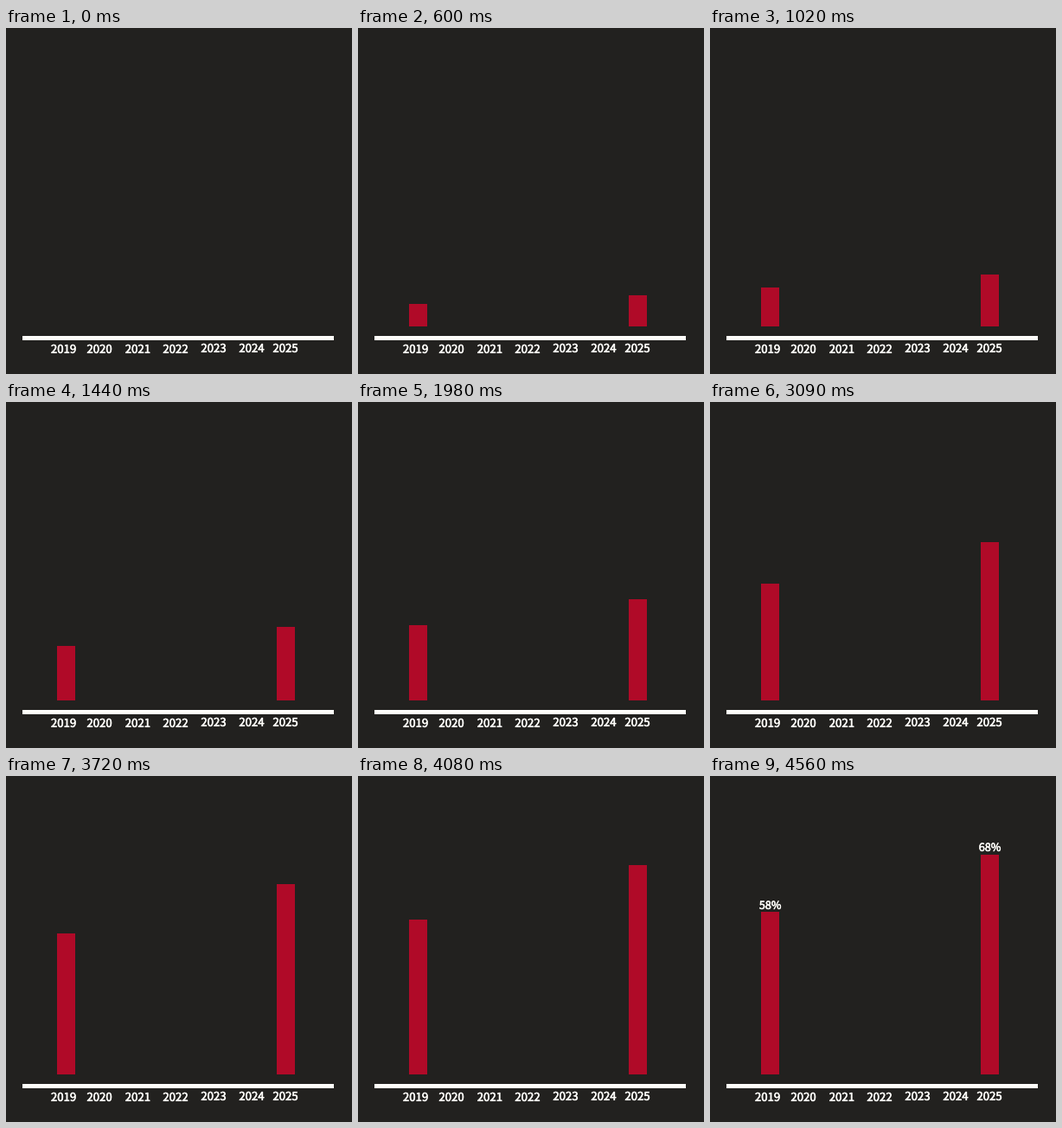
Animation of 400 by 400 pixels, one loop 5230 ms. Source, as a matplotlib script:

```python
import math

import matplotlib.pyplot as plt
from matplotlib.animation import FuncAnimation
from matplotlib.patches import Rectangle
from matplotlib.patheffects import withStroke

SIZE, DPI = 400, 100
PX = 72 / DPI                 # points per pixel
LOOP_MS, TICK_MS = 5230, 10
STEP_MS, STEPS = 30, 143      # bars grow linearly in whole pixels
LABEL_MS = 4560
BASE_Y = 345

BACKGROUND = "#22211f"
RED = "#b00a28"
WHITE = "#fffefa"

fig = plt.figure(figsize=(SIZE / DPI, SIZE / DPI), dpi=DPI, facecolor=BACKGROUND)
ax = fig.add_axes([0, 0, 1, 1])
ax.set_xlim(0, SIZE)
ax.set_ylim(SIZE, 0)
ax.axis("off")

# a thin outline gives the text a medium weight
MEDIUM = [withStroke(linewidth=0.5 * PX, foreground=WHITE)]


def box(x, y, width, height, color):
    return ax.add_patch(Rectangle((x, y), width, height, facecolor=color,
                                  linewidth=0, antialiased=False))


def label(x, baseline, text, px):
    return ax.text(x, baseline, text, color=WHITE, family="Noto Sans CJK JP",
                   fontsize=px * PX, ha="center", va="baseline",
                   path_effects=MEDIUM)


box(19, 356, 360, 5, WHITE)

YEARS = [(2019, 66.6, 376), (2020, 108, 376), (2021, 152.4, 376),
         (2022, 196, 376), (2023, 240, 375), (2024, 284, 375),
         (2025, 323, 375)]
for year, x, baseline in YEARS:
    label(x, baseline - 0.2, str(year), 13.2)

# left edge, final height, value, value baseline
BARS = [(59, 188, 58, 154), (313, 254, 68, 87)]
bars = [box(x, BASE_Y, 21, 0, RED) for x, *_ in BARS]
values = [label(x + 10.7, baseline - 0.2, f"{value}%", 12.6)
          for x, _, value, baseline in BARS]


def update(frame):
    t = frame * TICK_MS
    progress = min(t // STEP_MS, STEPS) / STEPS
    for bar, (_, full, *_) in zip(bars, BARS):
        height = math.floor(full * progress + 0.5)
        bar.set_y(BASE_Y - height)
        bar.set_height(height)
        bar.set_visible(height > 0)
    for value in values:
        value.set_visible(t >= LABEL_MS)
    return bars + values


anim = FuncAnimation(fig, update, frames=LOOP_MS // TICK_MS, interval=TICK_MS,
                     repeat=True, repeat_delay=0, blit=False)
plt.show()
```
